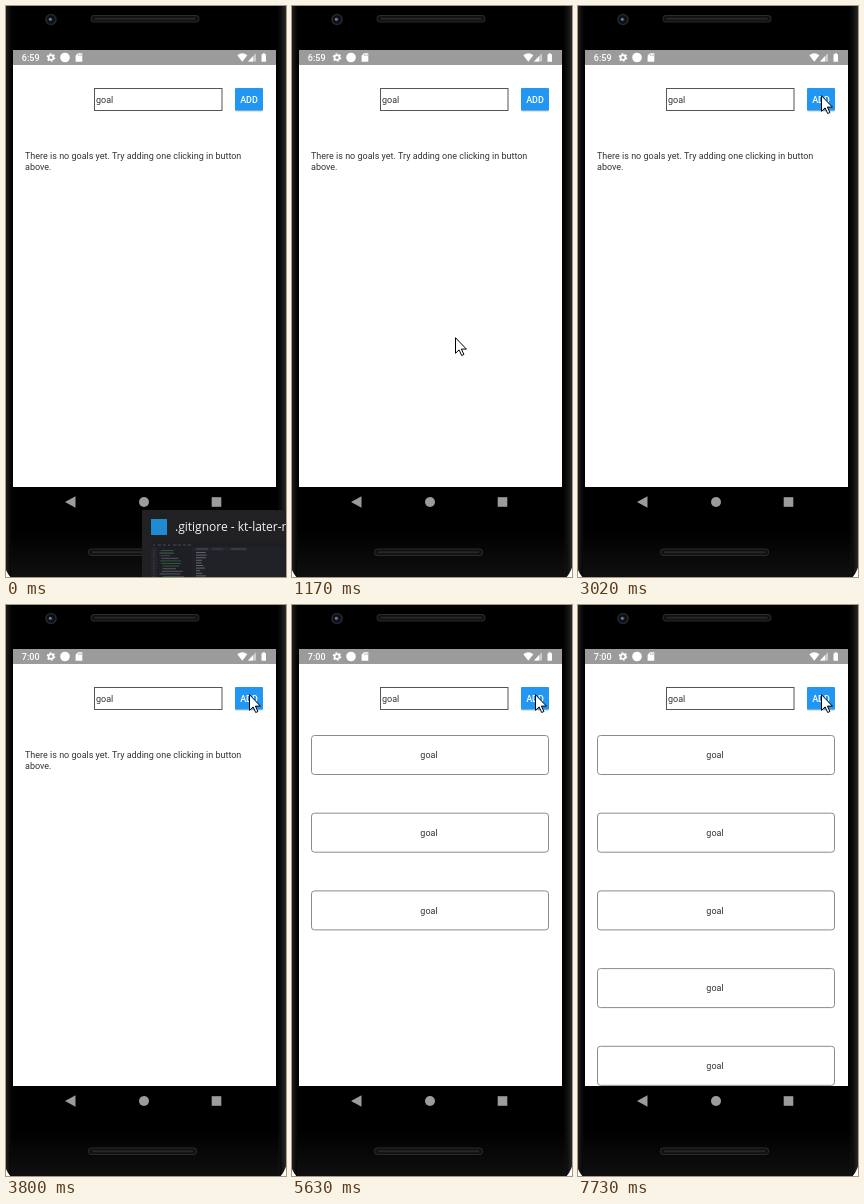
An HTML page for the animation above (8 s loop, 280x571 px).

```html
<!DOCTYPE html>
<html lang="en">
<head>
<meta charset="utf-8">
<title>Goal list</title>
<style>
  html, body { margin: 0; width: 100%; height: 100%; overflow: hidden; background: #fff; }
  svg { display: block; }
  text { font-family: Roboto, sans-serif; font-size: 9px; fill: #333; }
  .medium { font-weight: 500; }
  .light { fill: #fff; }
  .title { font-family: "Open Sans", "Noto Sans", sans-serif; font-size: 12px; fill: #f2f2f2; }
</style>
</head>
<body>
<svg width="280" height="571" viewBox="0 0 280 571">
  <defs>
    <linearGradient id="rim">
      <stop offset="0" stop-color="#303030"/>
      <stop offset=".009" stop-color="#1c1c1c"/>
      <stop offset=".022" stop-color="#080808"/>
      <stop offset=".03" stop-color="#000"/>
      <stop offset=".965" stop-color="#000"/>
      <stop offset=".978" stop-color="#0c0c0c"/>
      <stop offset=".99" stop-color="#1d1d1d"/>
      <stop offset="1" stop-color="#343434"/>
    </linearGradient>
    <linearGradient id="chin" x2="0" y2="1">
      <stop offset="0" stop-color="#1a1a1a" stop-opacity="0"/>
      <stop offset="1" stop-color="#1a1a1a"/>
    </linearGradient>
    <clipPath id="screen"><rect x="7" y="44" width="263" height="437"/></clipPath>
    <clipPath id="button"><rect x="229" y="82" width="28" height="22.5" rx="1"/></clipPath>
    <g id="speaker">
      <rect width="109" height="7.5" rx="3.7" fill="#2b2b2b"/>
      <rect x="1" y="1" width="107" height="5.5" rx="2.7" fill="#111"/>
      <path d="M4 3.7H105" stroke="#262626" stroke-width="2"/>
    </g>
  </defs>

  <!-- phone body -->
  <rect x="-2" y="-60" width="283" height="640" rx="26" fill="url(#rim)"/>
  <path d="M5 525H274V571H5Z" fill="url(#chin)" opacity=".6"/>
  <use href="#speaker" x="84.5" y="9"/>
  <use href="#speaker" x="82" y="542.5"/>
  <circle cx="45" cy="13.5" r="5.8" fill="#25272b"/>
  <circle cx="45" cy="13.5" r="4.2" fill="#0d0f14"/>
  <circle cx="44.5" cy="13.5" r="1.8" fill="#44577c"/>
  <circle cx="44" cy="13" r=".7" fill="#aebbd4"/>

  <!-- app -->
  <g clip-path="url(#screen)">
    <rect x="7" y="44" width="263" height="437" fill="#fff"/>
    <rect x="7" y="44" width="263" height="15" fill="#9b9b9b"/>
    <text id="clock" class="medium light" x="15.8" y="54.8">6:59</text>
    <circle cx="45" cy="51.5" r="2.4" fill="none" stroke="#fff" stroke-width="1.7"/>
    <circle cx="45" cy="51.5" r="3.7" fill="none" stroke="#fff" stroke-width="1.2" stroke-dasharray="1.9 1.97"/>
    <circle cx="59" cy="51.5" r="4.8" fill="#fff"/>
    <path d="M72 47.3H76.3V55.8H69.6V49.7Z" fill="#fff"/>
    <path d="M72.5 48.3V50M74 48.3V50M75.3 48.3V50" stroke="#9b9b9b" stroke-width=".6"/>
    <path d="M231.3 49.3Q236.3 45.3 241.3 49.3L236.3 55.8Z" fill="#fff"/>
    <path d="M250 47.3V55.5H242Z" fill="#fff" opacity=".5"/>
    <path d="M247 50.3V55.5H242Z" fill="#fff"/>
    <path d="M255.5 48.2H256.8V47.2H258.8V48.2H260V55.8H255.5Z" fill="#fff"/>

    <rect x="88.5" y="82.5" width="127.5" height="22" fill="#fff" stroke="#555"/>
    <text x="90" y="97">goal</text>

    <rect x="229" y="83.3" width="28" height="22.3" rx="1.3" fill="#000" opacity=".22"/>
    <rect x="229" y="82" width="28" height="22.5" rx="1" fill="#2196f3"/>
    <circle id="ripple" cx="243" cy="93" r="10" fill="#fff" opacity="0" clip-path="url(#button)"/>
    <text class="medium light" x="243" y="97" text-anchor="middle">ADD</text>

    <g id="empty">
      <text x="19" y="153">There is no goals yet. Try adding one clicking in button</text>
      <text x="19" y="163.5">above.</text>
    </g>
    <g id="cards"></g>
  </g>

  <!-- navigation -->
  <g fill="#9c9c9c">
    <path d="M59 496L69.5 490.3V501.7Z"/>
    <circle cx="138" cy="496" r="5"/>
    <rect x="205.7" y="491.2" width="9.6" height="9.6"/>
  </g>

  <!-- window preview -->
  <g id="preview">
    <rect x="136" y="500" width="150" height="80" fill="#212124"/>
    <rect x="145" y="509" width="16" height="16" fill="#1f8ad2"/>
    <text class="title" x="169" y="521">.gitignore - kt-later-n</text>
    <g id="thumb">
      <rect x="145" y="533" width="141" height="46" fill="#22232f"/>
      <rect x="145" y="533" width="141" height="4" fill="#191a24"/>
      <rect x="151" y="537" width="35" height="42" fill="#1b1c27"/>
      <rect x="145" y="537" width="6" height="42" fill="#292a38"/>
      <rect x="187" y="537" width="55" height="4" fill="#2c2d3d"/>
    </g>
  </g>

  <circle id="press" cx="243" cy="89" r="12" fill="#ff0" opacity="0"/>
  <path id="cursor" d="M.5 .7V16.3L4.1 12.9L6.7 18.5L8.9 17.5L6.4 12.1H11.4Z"
        fill="#fff" stroke="#000" stroke-width="1"/>
</svg>
<script>
const LOOP = 8000, STEP = 77;
const $ = id => document.getElementById(id);
const add = (parent, tag, attrs, text = "") => {
  const el = document.createElementNS("http://www.w3.org/2000/svg", tag);
  for (const k in attrs) el.setAttribute(k, attrs[k]);
  el.textContent = text;
  return parent.appendChild(el);
};

// Goal cards, each with the time it shows up
const cards = [3970, 4760, 5630, 6410, 7270].map((at, i) => {
  const y = 130.5 + i * 77.7;
  const el = add($("cards"), "g", {});
  add(el, "rect", { x: 19.5, y, width: 237, height: 39, rx: 3, fill: "#fff", stroke: "#8b8b8b" });
  add(el, "text", { x: 137, y: y + 22.8, "text-anchor": "middle" }, "goal");
  return { at, el };
});

// Tiny editor content in the preview
let seed = 11;
const rnd = () => (seed = seed * 16807 % 2147483647) / 2147483647;
const dash = (x, y, w, fill) => add($("thumb"), "rect", { x, y, width: w, height: 1, fill });
for (let x = 147; x < 185; x += 5) dash(x, 534.5, 2 + rnd() * 2, "#8c8e9c");
dash(190, 538.5, 12, "#9a9cab");
dash(206, 538.5, 11, "#72748a");
dash(225, 538.5, 15, "#5fae76");
for (let y = 540; y < 571; y += 2.6) {
  dash(147, y, 1.5, "#686a7c");
  dash(153 + rnd() * 4, y, 8 + rnd() * 16, rnd() < .45 ? "#43a65a" : "#a3a5b2");
  dash(190, y + 2, 4 + rnd() * 8, "#c3c5d0");
}

// Pointer legs: start, end, step count, from, to, easing
const linear = p => p;
const smooth = p => p * p * (3 - 2 * p);
const easeOut = p => 1 - (1 - p) ** 2;
const legs = [
  [410, 490, 2, [266, 504], [158, 474], linear],
  [660, 790, 4, [158, 474], [163, 331], easeOut],
  [1480, 2020, 8, [163, 331], [124, 132], smooth],
  [2097, 2250, 3, [124, 132], [190, 102], linear],
  [2330, 3020, 10, [190, 102], [243, 89], easeOut]
];

function pointer(t) {
  let pos = null;
  for (const [start, end, n, a, b, ease] of legs) {
    if (t < start) break;
    const k = Math.min(n, Math.floor((t - start) / (end - start) * (n - 1) + 1e-6) + 1);
    const p = start === 410 ? k - 1 : ease(k / n);
    pos = a.map((v, i) => Math.round(v + (b[i] - v) * p));
  }
  return pos;
}

const presses = [[3190, 3260], [4370, 4440], [5160, 5230], [5940, 6090], [6810, 6960], [7650, 7730]];
const ripples = [[3970, 4120], [4760, 4910], [6410, 6560], [7270, 7500]];
const within = (spans, t) => spans.find(([a, b]) => t >= a && t < b);

// Stepped values: the last entry whose time has passed
const at = (table, t) => table.reduce((v, [time, next]) => t >= time ? next : v, 0);
const slide = [[0, 4], [70, 1], [100, 0]];
const thumbFade = [[0, .4], [70, .75], [100, 1]];
const fade = [[0, 1], [1090, .55], [1170, 0]];

function render(t) {
  const pos = pointer(t);
  $("cursor").style.display = pos ? "" : "none";
  if (pos) $("cursor").setAttribute("transform", `translate(${pos})`);

  $("preview").setAttribute("transform", `translate(0 ${at(slide, t)})`);
  $("preview").setAttribute("opacity", at(fade, t));
  $("thumb").setAttribute("opacity", at(thumbFade, t));

  $("clock").textContent = t < 3800 ? "6:59" : "7:00";
  $("empty").style.display = t < cards[0].at ? "" : "none";
  for (const c of cards) c.el.style.display = t >= c.at ? "" : "none";

  $("press").setAttribute("opacity", within(presses, t) ? .47 : 0);
  const r = within(ripples, t);
  $("ripple").setAttribute("opacity", r ? .16 * (1 - Math.floor((t - r[0]) / STEP) / 4) : 0);
}

const begin = performance.now();
function tick() {
  render((performance.now() - begin) % LOOP);
  requestAnimationFrame(tick);
}
tick();
</script>
</body>
</html>
```
